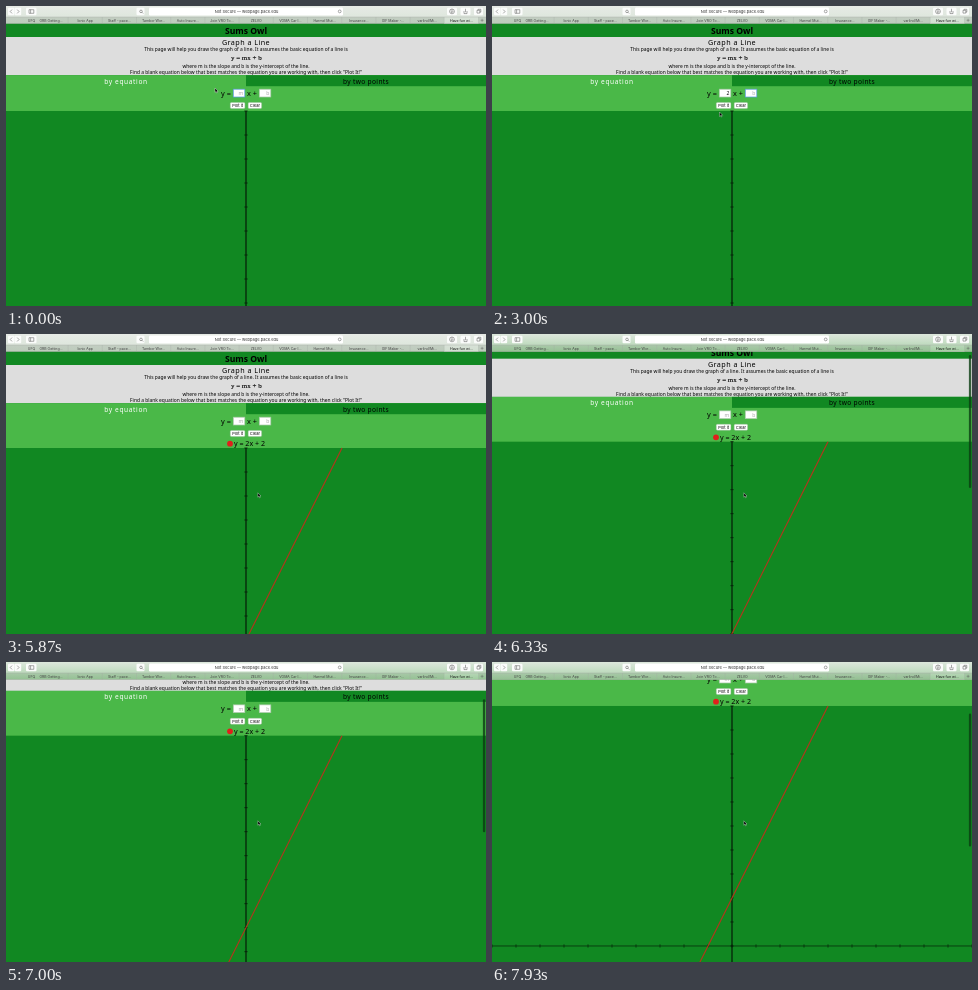
These frames come from a looping animation (480 px wide and 300 px high, 8 s). An HTML page:

```html
<!DOCTYPE html>
<html lang="en">
<head>
<meta charset="utf-8">
<title>Graph a Line</title>
<style>
html, body { margin: 0; width: 100%; height: 100%; overflow: hidden; background: #118822; }
svg { display: block; width: 480px; height: 300px; }
text { font-family: "Noto Sans", "Open Sans", sans-serif; text-anchor: middle; white-space: pre; }
.serif { font-family: "Liberation Serif", "Noto Serif", serif; }
.ui { font-family: Inter, Roboto, sans-serif; }
</style>
</head>
<body>
<svg id="stage" viewBox="0 0 480 300"></svg>
<script>
const LOOP = 8000, UNIT = 24;
const TYPE_M = 1500, FOCUS_B = 2130, TYPE_B = 3270, PRESS = 4470, PLOT = 4660, SCROLL = 6035;
const stage = document.getElementById('stage');

function el(parent, tag, attrs = {}, text) {
  const node = document.createElementNS('http://www.w3.org/2000/svg', tag);
  for (const key in attrs) node.setAttribute(key, attrs[key]);
  if (text !== undefined) node.textContent = text;
  parent.append(node);
  return node;
}
const rect = (p, x, y, width, height, fill, more) => el(p, 'rect', { x, y, width, height, fill, ...more });
const label = (p, x, y, size, text, more) => el(p, 'text', { x, y, 'font-size': size, ...more }, text);
const path = (p, d, stroke, width, more) => el(p, 'path', { d, stroke, 'stroke-width': width, fill: 'none', ...more });

// Page
const page = el(stage, 'g');
rect(page, 0, 0, 480, 700, '#118822');
label(page, 240, 28.3, 8.6, 'Sums Owl', { 'font-weight': 700 });
rect(page, 0, 31, 480, 38.2, '#dddddd');
label(page, 240, 39.2, 7.2, 'Graph a Line', { 'letter-spacing': 0.45 });
label(page, 240, 45.2, 4.9, 'This page will help you draw the graph of a line. It assumes the basic equation of a line is');
label(page, 240.3, 54.2, 7, 'y = mx + b', { class: 'serif', stroke: '#000', 'stroke-width': 0.12 });
label(page, 240, 62.2, 4.9, 'where m is the slope and b is the y-intercept of the line.');
label(page, 240, 68.1, 4.9, 'Find a blank equation below that best matches the equation you are working with, then click "Plot It!"');
const band = rect(page, 0, 69.2, 480, 36, '#4ab848');
rect(page, 240, 69.2, 240, 11, '#118822');
label(page, 120, 77.5, 6.6, 'by equation', { fill: '#fff', 'font-weight': 500, 'letter-spacing': 0.62 });
label(page, 360, 77.5, 6.6, 'by two points', { 'letter-spacing': 0.35 });

// Equation form
function field(x, hint) {
  const box = rect(page, x, 83.2, 11.5, 7.8, '#fff', { 'stroke-width': 0.7 });
  const text = label(page, x + 10, 89.1, 5, hint, { style: 'text-anchor:end' });
  return (value, focused) => {
    box.setAttribute('stroke', focused ? '#5b9be6' : '#a9c9a9');
    text.textContent = value || hint;
    text.setAttribute('fill', value ? '#000' : '#a9a9a9');
  };
}
function button(x, width, text) {
  const box = rect(page, x, 96.6, width, 6, '#fff', { rx: 1, stroke: '#9fb89f', 'stroke-width': 0.4 });
  label(page, x + width / 2, 101.1, 4.1, text, { class: 'ui' });
  return box;
}
label(page, 220, 89.6, 7.3, 'y =');
label(page, 246, 89.6, 7.3, 'x +');
const fieldM = field(227.3, 'm'), fieldB = field(253.3, 'b');
const plotButton = button(224.3, 14.6, 'Plot it');
button(242.2, 13.4, 'Clear');

const answer = el(page, 'g');
el(answer, 'circle', { cx: 224, cy: 109.7, r: 2.9, fill: '#e0201c' });
label(answer, 243.5, 112.2, 7.1, 'y = 2x + 2');

// Graph, origin at the crossing of the axes
const graph = el(page, 'g');
let ticksX = '', ticksY = '';
for (let i = -10; i <= 10; i++) {
  ticksX += `M${i * UNIT} -1.6v3.2`;
  ticksY += `M-1.6 ${i * UNIT}h3.2`;
}
path(graph, 'M-240 0H240' + ticksX, '#062c0b', 0.8);
path(graph, 'M0 -240V240', '#061a08', 1.2);
path(graph, ticksY, '#061a08', 0.8);
const curve = path(graph, `M${4 * UNIT} ${-10 * UNIT}L${-6 * UNIT} ${10 * UNIT}`, '#b5341c', 1.1);

// Scroll bar
const thumb = rect(stage, 476.9, 19, 2.3, 133, '#0a3d12', { rx: 1.1, opacity: 0.8 });

// Browser bars
const chrome = el(stage, 'g');
const defs = el(chrome, 'defs');
const fade = el(defs, 'linearGradient', { id: 'tint', x2: 0, y2: 1 });
el(fade, 'stop', { offset: 0, 'stop-color': '#7fc47f', 'stop-opacity': 0.12 });
el(fade, 'stop', { offset: 1, 'stop-color': '#5cb45c', 'stop-opacity': 0.5 });
rect(chrome, 0, 0, 480, 11, '#e9ebe8');
rect(chrome, 0, 11, 480, 6.6, '#cbcfca');
rect(chrome, 438, 11, 34.5, 6.6, '#e2e5e1');
const tint = rect(chrome, 0, 0, 480, 17.6, 'url(#tint)');
path(chrome, 'M0 11H480M0 17.5H480', '#a4aaa3', 0.4);
for (const [x, w] of [[2, 6.5], [8.7, 6.5], [20, 10.5], [130.5, 8], [441, 10], [454.5, 10], [468, 9]])
  rect(chrome, x, 1.8, w, 7.4, '#fbfcfb', { rx: 1 });
rect(chrome, 143, 1.5, 194, 8, '#fff', { rx: 1.2 });
path(chrome, 'M6 3.6L4.2 5.5L6 7.4M11.2 3.6L13 5.5L11.2 7.4M23 3.7h4.8v3.6h-4.8zM24.6 3.7v3.6' +
  'M136 6.3l1.2 1.2M446 3.3v3.2m-1.3 -1.2l1.3 1.3l1.3 -1.3M458 5v2.6h3V5M459.5 6.2V2.8' +
  'M471 4.3h2.8v2.8h-2.8zM472 4.3v-1h2.8v2.8h-1', '#555', 0.5);
for (const [cx, r] of [[135, 1.3], [446, 2.4], [333.7, 1.4]])
  el(chrome, 'circle', { cx, cy: 5.4, r, fill: 'none', stroke: '#555', 'stroke-width': 0.5 });
label(chrome, 240.5, 7, 4, 'Not Secure — webpage.pace.edu', { class: 'ui', fill: '#333' });
const tabs = ['ORB Getting…', 'Ionic App', 'Staff - pace…', 'Tambor Wor…', 'Auto Insure…', 'Join VRO To…', 'ZELVO',
  'VOMA Car I…', 'Harmel Mut…', 'Insurance…', 'GIF Maker -…', 'varlind/Mi…', 'Have fun wi…'];
label(chrome, 25.5, 15.5, 3.5, 'UFQ', { class: 'ui', fill: '#444' });
tabs.forEach((name, i) => {
  const x = 45 + i * 34.2;
  label(chrome, x, 15.5, 3.5, name, { class: 'ui', fill: i === 12 ? '#111' : '#444' });
  path(chrome, `M${x + 17.1} 11v6.6`, '#a4aaa3', 0.3);
});
path(chrome, 'M474.6 14.3h3M476.1 12.8v3', '#555', 0.4);

// Pointer
const pointer = el(stage, 'g');
const arrow = path(pointer, 'M0 0V4.4L1 3.5L1.7 5L2.4 4.7L1.8 3.2H3.1Z', '#fff', 0.35, { fill: '#000' });
const hand = path(pointer, 'M0.4 0V2.6L-0.8 2.2L0.3 5H2.8L3.3 2.4L1.2 1.8V0Z', '#fff', 0.4, { fill: '#111' });

const pointerKeys = [
  [0, 209, 82], [70, 209, 82], [300, 218, 69], [560, 230, 98], [800, 241, 115],
  [1200, 241, 115], [1480, 247, 123], [1800, 229, 107],
  [2670, 229, 107], [3000, 227.5, 106], [3200, 222, 106], [3470, 246, 99], [3530, 247, 99],
  [3670, 247, 99], [3900, 242, 104], [4200, 233, 98.5],
  [5070, 233, 98.5], [5300, 240, 122], [5730, 251.8, 158.8], [LOOP, 251.8, 158.8]
];
const scrollKeys = [[0, 0], [6000, 0], [6330, 6.3], [6730, 27.8], [7270, 51], [7930, 70], [LOOP, 71.8]];

// Smooth cubic through the keys; slopes vanish at rests and turns.
function along(keys, t, k) {
  let i = 0;
  while (i < keys.length - 2 && t >= keys[i + 1][0]) i++;
  const rate = j => (keys[j + 1][k] - keys[j][k]) / (keys[j + 1][0] - keys[j][0]);
  const slope = j => {
    if (j === 0) return rate(0);
    if (j === keys.length - 1) return rate(j - 1);
    const a = rate(j - 1), b = rate(j);
    return a * b > 0 ? 2 * a * b / (a + b) : 0;
  };
  const [a, b] = [keys[i], keys[i + 1]], span = b[0] - a[0], u = (t - a[0]) / span;
  const s = u * u * (3 - 2 * u);
  return a[k] + (b[k] - a[k]) * s + span * u * (1 - u) * (slope(i) * (1 - u) - slope(i + 1) * u);
}
const show = (node, on) => node.setAttribute('visibility', on ? 'visible' : 'hidden');
const move = (node, x, y) => node.setAttribute('transform', `translate(${x} ${y})`);

function draw(t) {
  const plotted = t >= PLOT, scroll = along(scrollKeys, t, 1);
  const x = along(pointerKeys, t, 1), y = along(pointerKeys, t, 2);
  move(page, 0, -scroll);
  move(graph, 240, plotted ? 354 : 345);
  band.setAttribute('height', plotted ? 44.8 : 35.8);
  show(answer, plotted);
  show(curve, plotted);
  fieldM(t >= TYPE_M && !plotted ? '2' : '', t < FOCUS_B);
  fieldB(t >= TYPE_B && !plotted ? '2' : '', t >= FOCUS_B && t < PRESS);
  plotButton.setAttribute('fill', t >= PRESS && !plotted ? '#d5dfd5' : '#fff');
  show(thumb, t >= SCROLL);
  thumb.setAttribute('y', 18 + scroll * 0.48);
  tint.setAttribute('opacity', Math.min(1, 0.25 + scroll / 9));
  const onButton = y > 96 && y < 103 && ((x > 224 && x < 239) || (x > 242 && x < 256));
  show(hand, onButton);
  show(arrow, !onButton);
  move(pointer, x, y);
}

const start = performance.now();
function tick() {
  draw((performance.now() - start) % LOOP);
  requestAnimationFrame(tick);
}
tick();
</script>
</body>
</html>
```
